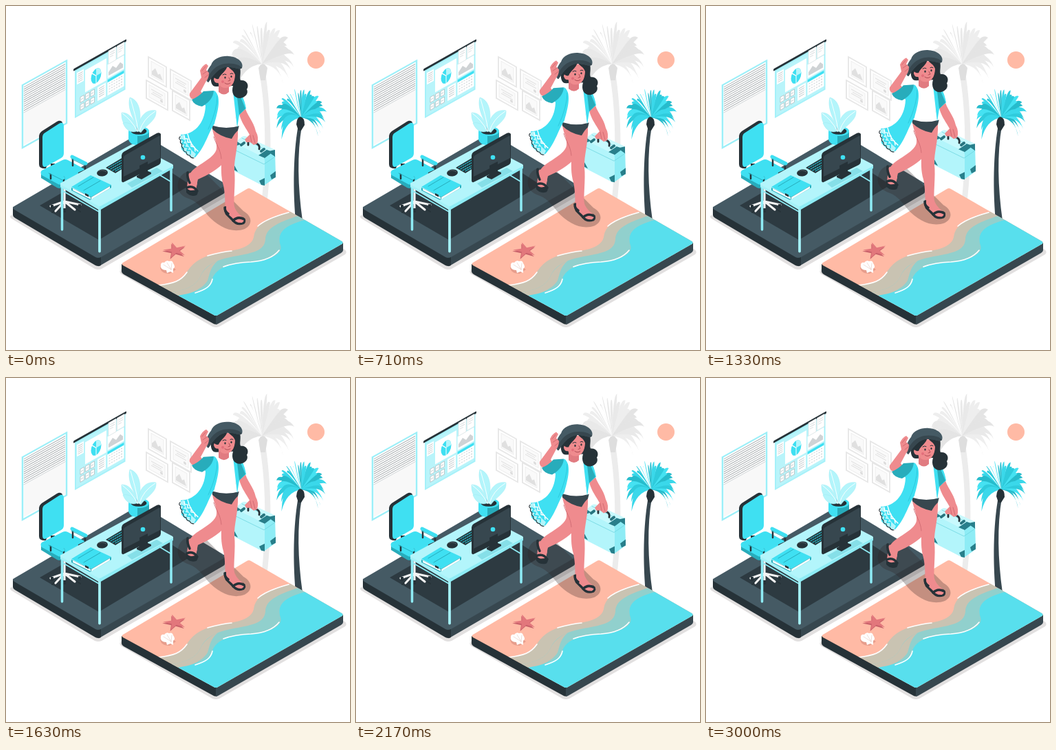
Animation of 500 by 500 pixels, one loop 3040 ms. Source, as an HTML page:

```html
<!DOCTYPE html>
<html lang="en">
<head>
<meta charset="utf-8">
<title>From desk to beach</title>
<style>
html, body { margin: 0; width: 100%; height: 100%; overflow: hidden; background: #fff; }
svg { display: block; width: 100vw; height: 100vh; }
.ink { fill: #263238; } .slate { fill: #37474f; }
.cyan { fill: #3fe0f2; } .teal { fill: #28acbb; } .ice { fill: #b3f5fb; } .aqua { fill: #8eecf5; }
.skin { fill: #ef8b8e; } .rose { fill: #e17b81; } .white { fill: #fff; }
.line { fill: none; stroke-linecap: round; stroke-linejoin: round; }
</style>
</head>
<body>
<svg viewBox="0 0 500 500" xmlns="http://www.w3.org/2000/svg">
  <defs>
    <clipPath id="sandClip"><path d="M170 373 L350 266Q353 264 356 266L488 342Q491 344 488 346L308 449Q305 451 302 449L170 377Q167 375 170 373Z"/></clipPath>
  </defs>

  <!-- ground shadows -->
  <path fill="#e2e0e0" d="M8 304Q4 306 8 309L129 382Q134 384 139 382L322 276V262L134 366Z"/>
  <path fill="#e2e0e0" d="M168 382Q163 386 168 390L300 466Q305 468 310 466L493 361Q497 357 491 353L305 448Z"/>

  <!-- window with blinds -->
  <g transform="matrix(1 -.555 0 1 23 114.500)">
    <rect x="1" y="1" width="64" height="91" fill="#fff" stroke="#9beff8" stroke-width="2.500"/>
    <rect x="3" y="43" width="60" height="46" fill="#f8f8f8"/>
    <g id="blinds" stroke="#9aa0a3" stroke-width=".9"></g>
    <path class="line" stroke="#d5d9db" stroke-width="1.200" d="M3 42H63"/>
  </g>

  <!-- planning board -->
  <g transform="matrix(1 -.565 0 1 100 93)">
    <rect width="73.500" height="70" fill="#a5f1f9"/>
    <rect x="2" y="3" width="69.500" height="65" fill="#b9f4fa"/>
    <g fill="#fff">
      <rect x="3" y="6" width="10" height="17"/><rect x="15" y="9" width="31" height="32"/>
      <rect x="47.500" y="19" width="24" height="20"/><rect x="33" y="44" width="12" height="20"/>
      <rect x="47.500" y="41" width="24" height="23"/>
    </g>
    <ellipse class="cyan" cx="31" cy="26" rx="7.500" ry="10.500"/>
    <path class="ice" d="M31 26V15.500A7.500 10.500 0 0 1 38.500 26Z"/>
    <path class="line" stroke="#fff" d="M31 36V26L25 19"/>
    <path fill="#cfd3d5" d="M49 36V31L55 25L60 31L66 26L70 31V36Z"/>
    <rect class="cyan" x="47.500" y="41" width="24" height="4"/>
    <g id="tiles" fill="#fff" stroke="#a9b4b8" stroke-width=".6"></g>
    <g id="notes" stroke="#bac2c5" stroke-width=".8"></g>
    <rect class="ink" x="-2" y="-2.500" width="77" height="3.200" rx="1"/>
    <g fill="#fff" stroke="#e1e1e1" stroke-width=".6"><rect x="49" y="0" width="11" height="19"/><rect x="61.500" y="0" width="10.500" height="18"/></g>
    <path stroke="#d0d5d7" stroke-width=".8" d="M51 4H58M51 7H58M51 10H56M63 4H70M63 7H70M63 10H68"/>
  </g>

  <g id="frames"></g>
  <circle cx="450.500" cy="78.500" r="12.500" fill="#ffbaa5"/>

  <!-- palms -->
  <path fill="#ececec" d="M368 96Q372 88 377 96C385 150 388 215 379 290H371C379 220 378 150 368 96Z"/>
  <g id="greyPalm"></g>
  <path fill="#dedede" d="M367 90Q373 78 380 90L377 108H370Z"/>
  <path class="slate" d="M425 172C419 205 416 255 421 312H431C424 262 423 215 430 174Z"/>
  <g id="cyanPalm"></g>
  <path class="ink" d="M422 172Q423 161 428 161Q434 162 434 173L429 181H425Z"/>

  <!-- office floor -->
  <path class="slate" d="M134 360L318 256V270Q318 272 316 273L139 376Q134 379 134 378Z"/>
  <path class="ink" d="M10 292V304Q10 306 13 308L130 377Q134 379 138 377V360Z"/>
  <path fill="#455a64" d="M12 291L190 187Q195 184 200 187L315 256Q320 260 315 263L138 365Q134 367 130 365L12 296Q8 293 12 291Z"/>
  <path fill="#2d3a41" d="M49 290L190 209L268 260L135 340Z"/>

  <!-- chair -->
  <path class="line" stroke="#263238" stroke-width="2" d="M67 300L86 285L108 299"/>
  <path class="line" stroke="#f3f3f3" stroke-width="3.200" d="M85 264V296M85 284L65 291M85 284L108 289M85 284L72 298M85 284L100 296"/>
  <path class="ink" d="M65 289h4v6h-4zM105 288h4v6h-4zM83 294h4v6h-4z"/>
  <path class="ink" d="M48 190Q48 185 52 182L74 168Q79 165 82 169L58 236Q48 237 48 230Z"/>
  <path class="cyan" d="M53 191Q53 186 57 184L77 171Q84 167 84 175V214Q84 219 80 221L59 233Q53 236 53 229Z"/>
  <path class="ink" d="M65 229h6v13h-6z"/>
  <path class="teal" d="M51 242L78 257L116 240V246L82 264Q78 266 74 264L51 250Z"/>
  <path class="cyan" d="M52 239L82 224Q86 222 90 224L114 237Q118 240 114 243L82 259Q78 261 74 258L52 246Q49 242 52 239Z"/>
  <path class="line" stroke="#263238" stroke-width="2.500" d="M97 222V232M115 230V239L106 243M65 241V251M84 249V257"/>
  <path class="line" stroke="#3fe0f2" stroke-width="5" d="M96 219L116 229M63 240L83 250"/>
  <path class="line" stroke="#28acbb" d="M95 222L115 232M62 243L82 253"/>

  <!-- plant -->
  <path class="teal" d="M178 183V194Q180 202 193 204Q206 202 208 194V183Z"/>
  <path class="cyan" d="M178 183V194Q180 201 191 203V183Z"/>
  <ellipse class="cyan" cx="193" cy="182" rx="15" ry="7"/><ellipse class="ink" cx="193" cy="182" rx="11.500" ry="4.800"/>
  <g fill="#b3f5fb" stroke="#9cebf3" stroke-width=".5">
    <path d="M192 182C189 168 175 151 180 133C191 136 199 149 193 182Z"/>
    <path d="M191 182C186 178 167 180 168 155C182 155 187 168 192 183Z"/>
    <path d="M193 182C191 165 201 149 218 152C219 166 207 170 196 184Z"/>
    <path d="M190 182C183 185 174 181 170 170C180 168 187 174 191 183Z"/>
  </g>
  <path class="line" stroke="#fff" stroke-width=".9" d="M192 182C190 165 185 149 181 135M191 182Q182 165 169 156M194 182Q199 164 217 153"/>

  <!-- desk -->
  <path class="line" stroke="#8eecf5" stroke-width="3.500" stroke-linecap="butt" d="M81.500 261V325M240 236V297"/>
  <path class="line" stroke="#8eecf5" stroke-width="2" d="M83 269L135 299M224 246L239 255"/>
  <path class="line" stroke="#a5f1f8" stroke-width="3.800" stroke-linecap="butt" d="M136 292V356.500"/>
  <path class="aqua" d="M135 290L243 231V236L136 297Z"/>
  <path fill="#a5f1f8" d="M79 257L136 290V297L79 263Z"/>
  <path class="ice" d="M80 257L181 202Q184 200 188 202L242 230Q244 232 242 233L139 290Q136 292 133 290L80 260Q78 258 80 257Z"/>
  <path fill="#86dfe8" d="M176 258L219 235L228 240L183 264Z"/>

  <!-- folders -->
  <path class="teal" d="M95 264V268L122 282L153 264V260L124 277Z"/>
  <path class="white" d="M97 265L123 278V281L97 268ZM124 278L151 262V265L124 281Z"/>
  <path class="cyan" d="M95 263L123 246L153 260L124 277Z"/>
  <path class="line" stroke="#28acbb" d="M105 262L127 249M113 268L137 254"/>
  <path class="ink" d="M115 272l5 2.500v3l-5 -2.500z"/>

  <!-- computer -->
  <ellipse class="ink" cx="140" cy="242.500" rx="8" ry="5" transform="rotate(-8 140 242.500)"/>
  <path class="line" stroke="#526168" d="M134 240Q140 237 146 241"/>
  <path class="ink" d="M145 235L170 220L183 228L159 243Z"/>
  <path class="line" stroke="#27bccb" stroke-width="1.300" stroke-dasharray="2 1.500" d="M149 235L170 223M152 237L173 225M155 239L177 227M159 240L179 229"/>
  <path class="ink" d="M190 247L204 239L211 242V244L197 252L190 249Z"/>
  <path class="ink" d="M168 217Q168 214 171 212L219 185Q223 183 225 186V226Q225 229 222 231L171 256Q168 257 168 253Z"/>
  <path fill="#37474f" d="M173 217L222 189Q224 188 224 190V221L171 248V221Q171 218 173 217Z"/>
  <path class="ink" d="M194 232L206 226V244L194 250Z"/>
  <circle class="cyan" cx="199" cy="220" r="3.300"/>

  <!-- beach -->
  <path class="ink" d="M168 375V386Q168 388 171 390L302 462Q305 463 306 462V448Z"/>
  <path class="slate" d="M305 449L490 344V355Q490 357 487 359L308 462Q306 463 305 463Z"/>
  <g clip-path="url(#sandClip)">
    <path fill="#ffbaa5" d="M160 260H500V460H160Z"/>
    <path fill="#c9c3b2" d="M215 408C240 404 252 401 262 388C274 368 291 362 319 357C341 354 357 349 360 336C362 317 380 309 414 299L500 345L305 460Z"/>
    <path fill="#91d0cd" d="M232 418C260 413 275 408 282 394C290 374 311 367 337 363C365 358 376 353 377 339C377 324 393 315 425 305L500 345L305 460Z"/>
    <path fill="#c9c3b2" d="M232 418C260 413 275 408 282 394C286 384 296 375 308 370C296 380 296 391 293 399C286 411 269 418 246 424Z"/>
    <path fill="#58dfed" d="M238 423C275 417 296 411 300 397C304 381 326 374 354 372C383 370 403 361 399 348C393 329 405 318 439 310L500 345L305 460Z"/>
    <path class="line" stroke="#fff" stroke-width="1.600" d="M222 406C244 403 254 400 263 387M293 363Q315 357 328 356M366 320Q378 309 411 300M275 417C291 412 298 407 300 397M316 379Q332 373 356 372Q385 370 397 355"/>
  </g>
  <path id="starShade" fill="#c9626b"/><path id="star" fill="#e2777c"/>
  <path fill="#e79d8c" d="M224 380Q225 389 238 389L247 383L240 378Z"/>
  <path class="white" d="M225 377Q225 372 230 373Q233 369 237 371Q242 369 243 374Q247 379 243 382L243 388L239 386L234 388L233 384Q224 384 225 377Z"/>
  <path class="line" stroke="#e6c5bc" stroke-width=".6" d="M240 383L229 376M240 383L234 373M240 383L241 374"/>

  <!-- traveller -->
  <g id="traveller">
    <path fill="#2b2020" opacity=".28" d="M252 251C258 239 275 235 291 244L345 298C358 305 359 318 347 324C329 331 308 321 293 304C283 291 276 283 263 279C250 274 247 262 252 251Z"/>
    <!-- suitcase -->
    <path class="aqua" d="M375 218L388 209Q391 208 391 212L392 246Q392 249 389 251L375 261Z"/>
    <path fill="#b3f5fb" d="M331 203Q331 199 335 199L371 218Q376 220 376 225V257Q376 262 371 260L334 241Q331 239 331 235Z"/>
    <path fill="#c9f9fd" d="M332 199L343 190Q346 188 350 190L389 208Q392 210 388 212L375 220Z"/>
    <path class="line" stroke="#6fd6e0" stroke-width=".8" d="M332 209L375 230L391 219M343 192L386 213"/>
    <path fill="#287f8b" d="M331 204V199L336 197L342 201ZM367 217L379 209L388 212L376 221ZM382 211L391 209V219L384 214ZM376 250V261L371 260L368 254ZM392 240V249L386 252L384 246ZM331 230L337 241L331 238Z"/>
    <path class="line" stroke="#28747f" stroke-width="4" d="M342 202L346 199M371 211L375 208"/>
    <path class="line" stroke="#263238" stroke-width="2.800" d="M352 202V197Q353 194 357 196L366 201Q369 203 368 208"/>

    <!-- legs -->
    <path class="skin" d="M303 184C305 200 309 207 303 214C294 226 275 232 268 243L267 262L276 265L279 252C293 246 309 237 319 225L329 190Z"/>
    <path class="ink" d="M262 265Q266 260 276 265Q281 270 277 275Q268 278 262 271Z"/>
    <path class="skin" d="M265 244Q270 240 274 247L278 258L276 267Q267 270 263 265Z"/>
    <path class="line" stroke="#263238" stroke-width="3.500" d="M264 242Q263 249 267 257M263 264Q272 260 278 269"/>
    <path class="skin" d="M300 178C301 190 311 206 313 221C313 237 312 247 316 261C319 275 318 286 319 296L328 303L332 299C330 282 334 257 332 239C331 222 338 205 337 179Z"/>
    <path class="line" stroke="#d06b73" stroke-width=".9" d="M302 190C305 201 312 208 313 222"/>
    <path class="ink" d="M317 298Q316 290 321 291L330 304L345 307Q351 312 346 317Q335 321 329 313L319 303Z"/>
    <path class="skin" d="M320 288H331Q333 299 343 306Q349 311 343 315Q334 316 329 308L320 300Z"/>
    <path class="line" stroke="#263238" stroke-width="3.500" d="M318 293Q318 299 323 302M330 312Q337 305 346 310"/>

    <!-- swimsuit and shirt -->
    <path class="slate" d="M299 171L339 173L337 181Q333 184 328 193Q311 190 300 179Z"/>
    <path class="white" d="M304 126Q318 119 334 126L341 157L340 174Q320 180 301 174L303 151Z"/>
    <path class="line" stroke="#e8e8e8" stroke-width=".8" d="M336 148L334 163"/>

    <!-- resting arm -->
    <path class="skin" d="M337 146L347 145C349 158 360 167 363 182Q368 191 365 200L360 202L355 198L349 198L347 194L354 187C347 174 339 166 337 146Z"/>
    <path class="line" stroke="#c9646d" stroke-width=".8" d="M355 188L357 198M359 188L362 199"/>
    <path class="cyan" d="M330 124Q339 124 343 130Q347 138 349 149L339 158L336 177Z"/>
    <path class="teal" d="M336 133L340 130L348 149L339 158Z"/>

    <!-- open robe -->
    <path class="cyan" d="M303 123C315 132 306 159 303 171C294 184 290 204 275 220Q266 221 255 208L254 187C272 187 289 172 290 145L285 137L303 123Z"/>
    <path class="line" stroke="#28c5d6" stroke-width=".8" d="M307 131Q307 151 294 179"/>
    <path class="ice" d="M253 189L258 187Q263 205 276 215L273 221Q256 217 253 189Z"/>
    <path class="line" stroke="#fff" stroke-width="1.400" d="M259 188l1 5l4 0l0 5l5 0l0 6l5 1l1 6M264 186Q267 201 279 211"/>
    <path class="line" stroke="#27d8eb" stroke-width="1.600" d="M255 194l4 2l-3 4l5 1l-2 4l6 1l-2 4l5 0l0 5"/>
    <path class="line" stroke="#263238" stroke-width="1.100" d="M253 190q-3 3 1 5q-2 4 2 6q-2 4 2 6q-1 5 4 5q0 5 5 5q1 4 6 4"/>

    <!-- hair, face and hat -->
    <path class="ink" d="M300 90C296 104 297 117 305 117L330 116C327 126 331 134 340 134C348 133 353 127 350 121C354 115 350 107 341 108C339 104 342 97 340 90Z"/>
    <path class="rose" d="M309 110L309 125Q317 132 324 125L324 115Z"/>
    <path class="skin" d="M307 97C305 112 311 120 320 119C330 118 334 109 333 92L318 88Z"/>
    <path class="skin" d="M309 105Q302 101 302 107Q304 114 310 111Z"/>
    <path class="ink" d="M300 92L322 86C320 96 312 98 309 106C304 107 299 103 300 92ZM321 86C325 92 331 93 333 100L340 94L338 85Z"/>
    <path fill="#455a64" d="M298 86C301 76 314 72 324 73C338 74 346 83 343 90C339 94 331 87 318 89C306 92 300 103 294 111C288 108 291 94 298 86Z"/>
    <path class="slate" d="M294 111C291 103 301 87 317 84C330 82 341 86 343 90C339 94 331 87 318 89C306 92 300 103 294 111Z"/>
    <ellipse class="ink" cx="318.500" cy="104" rx="1.100" ry="1.600"/><ellipse class="ink" cx="327.500" cy="102.500" rx="1.100" ry="1.600"/>
    <path class="line" stroke="#263238" d="M315 100Q318 98 320 99.500M326 98.500Q328 97 330 98.500"/>
    <path class="line" stroke="#a74750" stroke-width=".9" d="M324 104L326 108L323 109M318 112Q322 115 326 112"/>
    <circle cx="315" cy="110" r="2" fill="#e36f7b"/>

    <!-- raised arm -->
    <path class="skin" d="M284 104L282 94Q285 87 291 84L294 87L291 93L295 97Q295 105 291 109L283 124L288 131L274 137Q265 133 267 127Z"/>
    <path class="line" stroke="#c9646d" stroke-width=".8" d="M285 94L290 88M286 99L292 95M289 104L294 100"/>
    <path class="teal" d="M270 136Q280 132 287 124L302 123Q301 137 285 146Q273 144 270 136Z"/>
  </g>
</svg>
<script>
const LOOP = 3040, FLOAT = 3000, RISE = 10;
const el = id => document.getElementById(id);
const repeat = (n, make) => Array.from({ length: n }, (_, i) => make(i)).join('');

el('blinds').innerHTML = repeat(12, i => `<path d="M3 ${5 + i * 3.1}H63"/>`);
el('tiles').innerHTML = repeat(6, i =>
  `<rect x="${8 + i % 3 * 7.5}" y="${44 + (i / 3 | 0) * 11}" width="5.500" height="8"/>` +
  `<path d="M${9 + i % 3 * 7.5} ${48 + (i / 3 | 0) * 11}h3"/>`);
el('notes').innerHTML =
  repeat(5, i => `<path d="M4.500 ${9 + i * 2.8}h7M35 ${47 + i * 3}h8"/>`) +
  repeat(4, i => `<path stroke-dasharray="2 1.500" d="M49.500 ${48 + i * 4}h20"/>`);

// Pictures on the receding wall: x, y, width, height, kind
const frames = [[207, 74, 26, 29, 0], [239, 92, 30, 28, 1], [204, 108, 31, 26, 1], [242, 123, 25, 29, 0]];
el('frames').innerHTML = frames.map(([x, y, w, h, text]) => `
  <g transform="matrix(1 .56 0 1 ${x} ${y})">
    <rect width="${w}" height="${h}" fill="#fff" stroke="#e6e6e6" stroke-width="1.800"/>
    <rect x="4" y="4" width="${w - 8}" height="${h - 8}" fill="#fafafa" stroke="#eeeeee"/>
    ${text
      ? `<path stroke="#e2e2e2" stroke-width="1.200" d="M7 9h${w - 14}M9 12h${w - 18}M7 15h${w - 14}"/><circle cx="${w - 9}" cy="${h - 8}" r="2" fill="#dddddd"/>`
      : `<path fill="#e0e0e0" d="M5 ${h - 6}V${h - 11}L10 ${h - 18}L14 ${h - 11}L17 ${h - 14}L${w - 5} ${h - 6}Z"/>`}
  </g>`).join('');

// Fronds fan out from below one side to below the other, each arching over before its tip.
function palm(id, cx, cy, reach, height, drop, count, colors) {
  el(id).innerHTML = repeat(count, i => {
    const k = (i * 7) % count;
    const a = Math.PI * (1.22 - 1.44 * k / (count - 1));
    const size = 0.9 + 0.1 * Math.sin(k * 2.4 + 1);
    const up = Math.sin(a);
    const dx = Math.cos(a) * reach * 1.08 * size;
    const dy = (up > 0 ? -up * height : -up * drop * 1.5) * size;
    const bx = cx + dx * 0.8, by = cy - height * (0.42 + 0.45 * up);
    const w = reach * 0.1;
    return `<path fill="${colors[i % colors.length]}" d="M${cx} ${cy}Q${bx - w} ${by - w} ${cx + dx} ${cy + dy}Q${bx + w * 0.4} ${by + w * 2.6} ${cx} ${cy}Z"/>`;
  });
}
palm('greyPalm', 372, 84, 45, 62, 38, 31, ['#e4e4e4', '#eeeeee', '#e9e9e9']);
palm('cyanPalm', 429, 162, 35, 43, 34, 37, ['#3ad8ea', '#27bccc', '#45e2f2', '#2fcbdc']);

function starPath(cx, cy) {
  const points = Array.from({ length: 10 }, (_, i) => {
    const a = i * Math.PI / 5 + Math.PI + 0.05, r = i % 2 ? 6 : 18;
    return `${cx + r * Math.cos(a)} ${cy + r * 0.65 * Math.sin(a)}`;
  });
  return `M${points.join('L')}Z`;
}
el('star').setAttribute('d', starPath(246, 355));
el('starShade').setAttribute('d', starPath(245, 357));

const traveller = el('traveller');
// Steady rise and fall, then a short rest before the loop closes.
function draw(now) {
  const phase = Math.min(now % LOOP / FLOAT, 1);
  const lift = RISE * (1 - Math.abs(2 * phase - 1));
  traveller.setAttribute('transform', `translate(0 ${-lift})`);
}
const start = performance.now();
function tick() {
  draw(performance.now() - start);
  requestAnimationFrame(tick);
}
draw(0);
requestAnimationFrame(tick);
</script>
</body>
</html>
```
